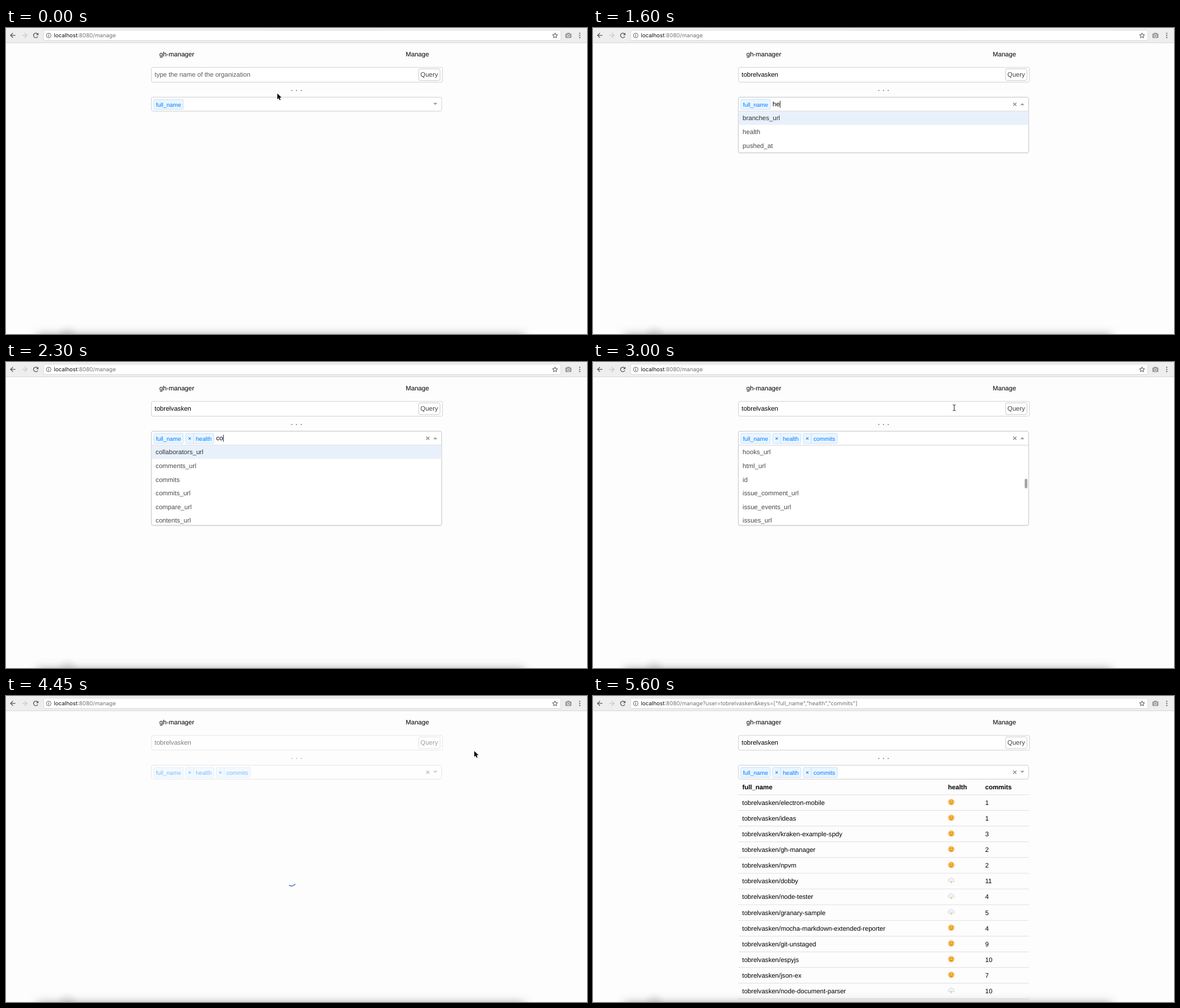
Write an HTML page with a canvas that moves like this. It is 1000 px wide and 528 px high and loops after 5.65 s.

```html
<!DOCTYPE html>
<html lang="en">
<head>
<meta charset="utf-8">
<title>gh-manager</title>
<style>
html, body { margin: 0; width: 100%; height: 100%; overflow: hidden; background: #fdfdfd; }
canvas { display: block; width: 1000px; height: 528px; }
</style>
</head>
<body>
<canvas id="stage"></canvas>
<script>
const W = 1000, H = 528, LOOP = 5650;
const SANS = '"Liberation Sans", Arial, sans-serif';
const UI = 'Inter, Roboto, sans-serif';
const USER = 'tobrelvasken';
const BLUE = '#007eff';

// Moments of the story, in ms
const FOCUS = 250, TYPE = 350, OPEN = 1400, FILTER = 1500, PICK1 = 2100,
      PICK2 = 2700, QUERY = 3200, LOAD = 3250, DONE = 4700, LEAVE = 5100;

const KEYS = ('archive_url assignees_url blobs_url branches_url clone_url collaborators_url ' +
  'comments_url commits commits_url compare_url contents_url contributors_url created_at ' +
  'default_branch deployments_url description downloads_url events_url fork forks forks_count ' +
  'forks_url git_commits_url git_refs_url git_tags_url git_url has_downloads has_issues ' +
  'has_pages has_wiki health homepage hooks_url html_url id issue_comment_url ' +
  'issue_events_url issues_url keys_url labels_url language pushed_at size').split(' ');

const REPOS = [
  ['electron-mobile', 1, 1], ['ideas', 1, 1], ['kraken-example-spdy', 1, 3],
  ['gh-manager', 1, 2], ['npvm', 1, 2], ['dobby', 0, 11], ['node-tester', 0, 4],
  ['granary-sample', 0, 5], ['mocha-markdown-extended-reporter', 1, 4],
  ['git-unstaged', 1, 9], ['espyjs', 1, 10], ['json-ex', 1, 7],
  ['node-document-parser', 0, 10]
];

// Pointer path: time, x, y
const PATH = [[0, 467, 113], [50, 467, 113], [250, 455, 82], [950, 455, 82], [1100, 480, 122],
  [2850, 480, 122], [3000, 621, 79], [3100, 695, 68], [3180, 729, 80], [3250, 729, 80],
  [3450, 806, 95], [LOOP, 806, 95]];

const canvas = document.getElementById('stage');
const dpr = window.devicePixelRatio || 1;
canvas.width = W * dpr;
canvas.height = H * dpr;
const c = canvas.getContext('2d');

const clamp = (v, a, b) => Math.min(b, Math.max(a, v));
const within = (t, a, b) => t >= a && t < b;

function text(s, x, y, color = '#000', size = 11.11, font = SANS, weight = '') {
  c.font = `${weight} ${size}px ${font}`;
  c.fillStyle = color;
  c.fillText(s, x, y);
  return c.measureText(s).width;
}

function box(x, y, w, h, r, fill, stroke, lw = 0.8) {
  c.beginPath();
  c.roundRect(x, y, w, h, r);
  if (fill) { c.fillStyle = fill; c.fill(); }
  if (stroke) { c.strokeStyle = stroke; c.lineWidth = lw; c.stroke(); }
}

function poly(points, color, closed) {
  c.beginPath();
  points.forEach(([x, y], i) => i ? c.lineTo(x, y) : c.moveTo(x, y));
  if (closed) { c.fillStyle = color; c.fill(); }
  else { c.strokeStyle = color; c.stroke(); }
}

function disc(x, y, r, color) {
  c.beginPath();
  c.arc(x, y, r, 0, 7);
  c.fillStyle = color;
  c.fill();
}

function cross(x, y, r, color, lw) {
  c.lineWidth = lw;
  poly([[x - r, y - r], [x + r, y + r]], color);
  poly([[x + r, y - r], [x - r, y + r]], color);
}

function arrow(x, dir, color) {
  c.lineWidth = 1.2;
  poly([[x - 4.2, 12.7], [x + 4.2, 12.7]], color);
  poly([[x, 8.6], [x + 4.2 * dir, 12.7], [x, 16.8]], color);
}

function toolbar(t) {
  c.fillStyle = '#eeeeee';
  c.fillRect(0, 0, W, 25);
  c.fillStyle = '#cfcfcf';
  c.fillRect(0, 25, W, 0.8);
  arrow(12, -1, '#555');
  arrow(32, 1, '#c8c8c8');

  c.strokeStyle = '#555';
  c.lineWidth = 1.3;
  c.beginPath();
  c.arc(51.3, 12.8, 3.9, 0.5, 5.5);
  c.stroke();
  poly([[55.9, 8.2], [55.9, 12.2], [51.9, 12.2]], '#555', true);

  box(64.8, 3.8, 890.2, 17.8, 2, '#fff', '#d2d2d2');
  c.strokeStyle = '#555';
  c.lineWidth = 0.9;
  c.beginPath();
  c.arc(73.5, 12.9, 4, 0, 7);
  c.stroke();
  c.fillStyle = '#555';
  c.fillRect(73, 12.2, 1, 3);
  c.fillRect(73, 10.3, 1, 1.1);

  const w = text('localhost', 82.5, 16.3, '#111', 9.5, UI);
  const query = t < DONE ? '' : `?user=${USER}&keys=["full_name","health","commits"]`;
  text(':8080/manage' + query, 82.5 + w, 16.3, '#737373', 9.5, UI);

  const star = [];
  for (let i = 0; i < 11; i++) {
    const a = -Math.PI / 2 + i * Math.PI / 5, r = i % 2 ? 2 : 4.6;
    star.push([945 + r * Math.cos(a), 13.2 + r * Math.sin(a)]);
  }
  c.lineWidth = 1;
  poly(star, '#555');

  box(962.8, 9.6, 10.4, 7.6, 1.2, '#999');
  box(965.6, 8.3, 4.8, 2, 0.6, '#999');
  disc(968, 13.3, 2.6, '#eee');
  disc(968, 13.3, 1.6, '#999');
  for (const y of [9.2, 12.8, 16.4]) disc(987.5, y, 1.05, '#555');
}

function caret(x, y) {
  c.fillStyle = '#000';
  c.fillRect(x + 0.2, y - 9.6, 0.9, 12);
}

function orgField(t) {
  const focused = within(t, FOCUS, OPEN);
  box(250.3, 68, 501, 25.4, 2.6, '#fff', focused ? '#7f9fce' : '#c6c6c2', focused ? 1.1 : 0.8);
  const n = clamp(Math.floor((t - TYPE) / 42) + 1, 0, USER.length);
  const w = n ? text(USER.slice(0, n), 255.8, 84)
              : text('type the name of the organization', 255.8, 84, '#5c5c5c') * 0;
  if (focused && t < 1050) caret(255.8 + w, 84);
  box(710.2, 70.6, 36.8, 20, 2.8, '#fff', '#bdbdbd');
  text('Query', 713.3, 84.2, '#444');
  c.fillStyle = '#222';
  for (const x of [491.3, 499.4, 507.5]) c.fillRect(x, 107.1, 1.3, 1.3);
}

function chip(label, x, closable) {
  c.font = `10px ${SANS}`;
  const side = closable ? 14 : 0;
  const w = c.measureText(label).width + side + 8;
  box(x + 0.3, 123.5, w - 0.6, 17, 1.4, '#ebf5ff', '#b9dbfc', 0.75);
  if (closable) {
    c.fillStyle = '#b9dbfc';
    c.fillRect(x + 13.7, 123.5, 0.75, 17);
    cross(x + 7.3, 132, 2, BLUE, 1.05);
  }
  text(label, x + side + 3.9, 135.5, BLUE, 10);
  return x + w + 3.5;
}

// What is being typed into the select
function filterText(t) {
  if (t < PICK1) return 'health'.slice(0, clamp(Math.floor((t - FILTER) / 75) + 1, 0, 6));
  if (t < 2150 || t >= PICK2) return '';
  return 'commits'.slice(0, t < 2300 ? 1 : 2 + Math.floor((t - 2300) / 60));
}

function menu(t, typed, chosen) {
  let keys = KEYS.filter(k => k.includes(typed) && !chosen.includes(k));
  const scrolled = !typed && t >= PICK1;
  if (scrolled) keys = keys.slice(keys.indexOf('hooks_url'));
  keys = keys.slice(0, 6);
  const top = 143.6, row = 23.65;
  const h = Math.min(keys.length * row + 0.4, 138);
  c.save();
  c.shadowColor = 'rgba(0,0,0,.08)';
  c.shadowBlur = 2 * dpr;
  c.shadowOffsetY = dpr;
  box(250.3, top, 499.4, h, [0, 0, 2.8, 2.8], '#fff', '#c4c4c4');
  c.restore();
  c.save();
  box(250.7, top, 498.6, h - 0.4, [0, 0, 2.4, 2.4]);
  c.clip();
  keys.forEach((key, i) => {
    const y = top + i * row, hot = !i && !scrolled;
    if (hot) {
      c.fillStyle = '#e8f1fb';
      c.fillRect(250, y, 500, row);
    }
    text(key, 257.6, y + 15.6, hot ? '#333' : '#4a4a4a');
  });
  c.restore();
  c.fillStyle = '#e4e6e8';
  c.fillRect(250.7, top - 0.4, 498.6, 0.8);
  if (t >= PICK2) box(743, 201.5, 4.6, 16.5, 2.3, '#a3a3a3');
}

function select(t) {
  const open = within(t, OPEN, QUERY);
  const chosen = ['full_name'];
  if (t >= PICK1) chosen.push('health');
  if (t >= PICK2) chosen.push('commits');
  box(250.3, 119.4, 499.4, 24, open ? [2.8, 2.8, 0, 0] : 2.8, '#fff', open ? '#b8b8b8' : '#c4c4c4');
  let x = 254;
  chosen.forEach((k, i) => { x = chip(k, x, i > 0); });

  if (t >= TYPE) cross(726, 131.6, 2.7, '#8a8a8a', 1.35);
  const y = open ? 133.2 : 129.2, d = open ? -3.5 : 3.5;
  poly([[735.4, y], [742.4, y], [738.9, y + d]], '#999', true);

  if (!open) return;
  const typed = filterText(t);
  const w = text(typed, x + 0.2, 135.2);
  if (t < 2900) caret(x + 0.2 + w, 135.2);
  menu(t, typed, chosen);
}

function sun(x, y) {
  disc(x, y, 5.3, '#f3a83b');
  disc(x, y, 4.3, '#fbc04a');
  disc(x - 1.7, y - 1.2, 0.75, '#7d4a16');
  disc(x + 1.7, y - 1.2, 0.75, '#7d4a16');
  c.strokeStyle = '#a8591b';
  c.lineWidth = 0.9;
  c.beginPath();
  c.arc(x, y + 0.3, 2.5, 0.4, 2.74);
  c.stroke();
}

function cloud(x, y) {
  const puffs = [[-3, 0, 2.3], [0, -1.7, 3], [3, 0, 2.3]];
  for (const [dx, dy, r] of puffs) disc(x + dx, y + dy, r + 0.5, '#c3c8cc');
  for (const [dx, dy, r] of puffs) disc(x + dx, y + dy, r, '#f1f3f5');
  c.lineWidth = 0.9;
  poly([[x + 0.8, y + 1], [x - 0.7, y + 3], [x + 0.7, y + 3], [x - 0.6, y + 5.3]], '#e5bd55');
}

function table() {
  const row = 27.1;
  [['full_name', 257], ['health', 611], ['commits', 675]]
    .forEach(([s, x]) => text(s, x, 160.6, '#000', 11.11, SANS, 'bold'));
  c.fillStyle = '#d9d9d9';
  for (let i = 0; i <= REPOS.length; i++) c.fillRect(250, 170 + i * row, 500, 0.8);
  REPOS.forEach(([name, healthy, commits], i) => {
    const y = 187.8 + i * row;
    text(`${USER}/${name}`, 256.8, y);
    (healthy ? sun : cloud)(616.6, y - 4.8);
    text(commits, 675, y);
  });
}

function spinner(t) {
  const mid = 1.35 + (t - 4450) / 1000 * Math.PI * 2;
  c.strokeStyle = '#6791c4';
  c.lineWidth = 2;
  c.beginPath();
  c.arc(491.4, 320.2, 7.6, mid - 0.8, mid + 0.8);
  c.stroke();
}

function pointer(t) {
  if (within(t, TYPE, 950) || within(t, FILTER, 2850) || t >= LEAVE) return;
  const i = PATH.findIndex(p => p[0] > t);
  const [t0, x0, y0] = PATH[i - 1], [t1, x1, y1] = PATH[i];
  const k = (t - t0) / (t1 - t0);
  const x = x0 + (x1 - x0) * k, y = y0 + (y1 - y0) * k;
  if (within(x, 251, 709) && within(y, 68, 94)) {
    c.lineWidth = 1;
    poly([[x, y - 4.3], [x, y + 4.3]], '#222');
    for (const s of [-1, 1])
      poly([[x - 2.5, y + s * 5.3], [x, y + s * 4.3], [x + 2.5, y + s * 5.3]], '#222');
    return;
  }
  const shape = [[0, 0], [0, 10], [2.3, 7.9], [3.9, 11.6], [5.6, 10.9], [4, 7.3], [7.1, 7.1], [0, 0]]
    .map(([a, b]) => [x + a, y + b]);
  c.lineWidth = 1.3;
  c.lineJoin = 'round';
  poly(shape, '#fff');
  poly(shape, '#000', true);
  c.lineJoin = 'miter';
}

function bottomShadow() {
  c.save();
  c.shadowColor = 'rgba(0,0,0,.34)';
  c.shadowBlur = 15 * dpr;
  c.fillStyle = '#888';
  c.fillRect(54, 529, 838, 30);
  c.restore();
  const g = c.createRadialGradient(106, 530, 0, 106, 530, 20);
  g.addColorStop(0, 'rgba(0,0,0,.10)');
  g.addColorStop(1, 'rgba(0,0,0,0)');
  c.fillStyle = g;
  c.fillRect(80, 508, 52, 20);
}

function draw(now) {
  const t = now % LOOP;
  c.setTransform(dpr, 0, 0, dpr, 0, 0);
  c.textRendering = 'geometricPrecision';
  c.fillStyle = '#fdfdfd';
  c.fillRect(0, 0, W, H);
  toolbar(t);
  text('gh-manager', 264, 49.2);
  text('Manage', 688, 49.2);

  c.globalAlpha = t < DONE ? 1 - 0.5 * clamp((t - LOAD) / 100, 0, 1)
                           : 0.5 + 0.5 * clamp((t - DONE) / 150, 0, 1);
  orgField(t);
  select(t);
  if (t >= DONE) table();
  c.globalAlpha = 1;
  if (within(t, LOAD, DONE)) spinner(t);
  bottomShadow();
  pointer(t);
}

function frame(now) {
  draw(Math.max(0, now));
  requestAnimationFrame(frame);
}
draw(0);
requestAnimationFrame(frame);
</script>
</body>
</html>
```
